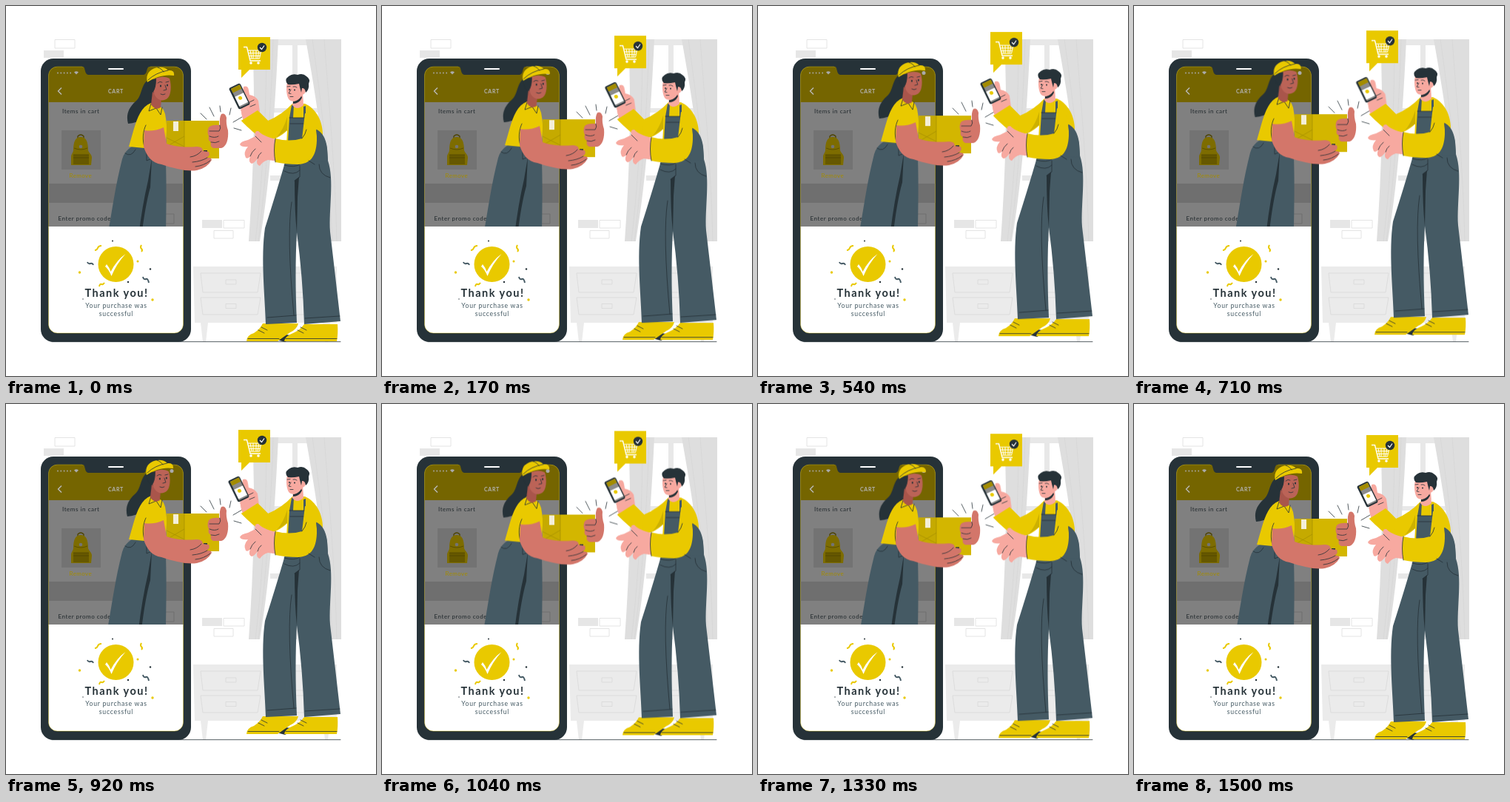
An HTML page without scripts that plays this animation: 500x500 px, repeating every 1540 ms.

```html
<!DOCTYPE html>
<html lang="en">
<head>
<meta charset="utf-8">
<title>Thank you</title>
<style>
html, body { margin: 0; width: 100%; height: 100%; overflow: hidden; background: #fff; }
svg { display: block; width: 100vw; height: 100vh; }
text { font-family: Lato, sans-serif; }
.bob, .sway { animation: 1540ms infinite cubic-bezier(.3, .2, .7, .8); }
.bob { animation-name: bob; }
.sway { animation-name: sway; }
@keyframes bob { 0%, 97.4%, 100% { transform: none; } 47.7% { transform: translateY(-9px); } }
@keyframes sway { 0%, 97.4%, 100% { transform: none; } 47.7% { transform: translateX(-1.5px); } }
.yellow { fill: #e9c900; }
.ink { fill: #263238; }
.denim { fill: #455a64; }
.pink { fill: #f7a9a0; }
.brown { fill: #d3766a; }
.line { fill: none; stroke: #263238; stroke-width: .8; stroke-linecap: round; stroke-linejoin: round; }
.pale { fill: none; stroke: #dedede; stroke-width: .8; }
.fold { fill: none; stroke: #d3d3d3; stroke-width: .6; }
</style>
</head>
<body>
<svg viewBox="0 0 500 500">
<defs>
  <clipPath id="aboveSheet"><rect width="500" height="298"/></clipPath>
  <clipPath id="screen"><rect x="57.500" y="82" width="182" height="360" rx="12"/></clipPath>
</defs>

<!-- room -->
<g id="room">
  <rect x="357" y="45" width="96" height="273" fill="#e8e8e8"/>
  <path fill="#fff" d="M362 53H387V138H356ZM394 53H411L424 138H394ZM355 144H387V229H346ZM394 144H425L432 229H394ZM345 236H387V318H343ZM394 236H433L438 318H394Z"/>
  <path fill="#dedede" d="M333 45H368C364 130 358 230 343 318H328C335 220 337 130 333 45ZM405 45H453V318H437C434 215 420 130 405 45Z"/>
  <path class="fold" d="M352 45C352 150 346 240 337 318M361 45C358 150 350 245 341 318M414 45C426 130 437 220 441 318M430 45C436 130 445 220 447 318"/>
  <rect x="51" y="60" width="27" height="10" fill="#e6e6e6"/>
  <rect x="265" y="289" width="27" height="11" fill="#e6e6e6"/>
  <path class="pale" d="M66 45.500H93V57H66ZM294 289.500H322V300H294ZM281 303.500H307V314H281Z"/>
  <path fill="#ebebeb" d="M253 352H447V428H255ZM263 428H273L270 454H266ZM428 428H438L435 454H431Z"/>
  <path fill="none" stroke="#d6d6d6" stroke-width=".7" d="M263 361H344L340 387H266ZM263 394H344L340 417H266ZM297 370H311V376H297ZM297 402.500H311V408.500H297ZM355 361H437L433 387H359ZM355 394H437L433 417H359Z"/>
  <path class="line" d="M62 453.700H452"/>
</g>

<!-- phone -->
<rect class="ink" x="47" y="71" width="203" height="383" rx="17"/>
<g clip-path="url(#screen)">
  <rect x="57" y="82" width="183" height="217" fill="#808080"/>
  <rect x="57" y="82" width="183" height="48" fill="#756500"/>
  <rect x="57" y="240" width="183" height="26" fill="#6f6f6f"/>
  <rect x="75" y="168" width="53" height="53" fill="#737373"/>
  <path d="M70 90.500H88" stroke="#aaa" stroke-width="1.800" stroke-linecap="round" stroke-dasharray="0 4.300"/>
  <path d="M92 89.500Q95 87 98 89.500L95 92.500Z" fill="#aaa"/>
  <circle cx="224" cy="90.500" r="2.500" fill="#aaa"/>
  <path d="M75 110.500L70.500 115L75 119.500" fill="none" stroke="#bbb" stroke-width="1.300"/>
  <text x="138" y="117.500" font-size="7" font-weight="700" letter-spacing=".7" fill="#b5b5b5">CART</text>
  <g fill="#20282c" font-size="8" letter-spacing=".55">
    <text x="76" y="145">Items in cart</text>
    <text x="70.500" y="289.500">Enter promo code</text>
  </g>
  <text x="85.500" y="232" font-size="8" letter-spacing=".4" fill="#a38c00">Remove</text>
  <g id="backpack">
    <path d="M97 179V176Q101 172 105 176V179" fill="none" stroke="#4d4300" stroke-width="1.300"/>
    <path d="M88 215V204C88 200 91 198 91 195C91 183 94 177 101 177S111 183 111 195C112 199 116 200 116 205L115 215Z" fill="#7d6c00"/>
    <path d="M91 201H112V214H91Z" fill="#665800"/>
    <path d="M91 201H112M91 205H112M92 192Q101 196 110 192" fill="none" stroke="#4d4300" stroke-width=".7"/>
    <circle cx="101" cy="190" r="2.300" fill="#737373"/>
  </g>
  <path d="M150 281H227V294H150Z" fill="none" stroke="#6a6a6a" stroke-width=".8"/>
  <rect x="57" y="298" width="183" height="144" fill="#fff"/>
</g>
<rect x="57.500" y="82" width="182" height="360" rx="12" fill="none" stroke="#e9c900" stroke-width=".6" opacity=".6"/>
<path class="ink" d="M103 81H195V82C191 82 191 85 190 88Q189 93 185 93H112Q108 93 107 88C106 84 106 82 103 82Z"/>
<path d="M139 85H158" stroke="#fff" stroke-width="2" stroke-linecap="round"/>

<g id="thanks">
  <circle class="yellow" cx="148.500" cy="349" r="24"/>
  <path fill="#fff" d="M136 349Q139.500 353 141.500 359Q150 343 161.500 335Q149 349 142.500 365Q139 356 134 352Z"/>
  <g class="yellow">
    <circle cx="178" cy="345" r="1.500"/><circle cx="99.500" cy="360" r="1.700"/><circle cx="198" cy="397" r="1.700"/>
  </g>
  <g class="ink">
    <circle cx="144" cy="317.500" r="1"/><circle cx="165" cy="373" r="1.200"/><circle cx="195" cy="355.500" r="1.200"/><circle cx="104" cy="396" r=".7"/>
  </g>
  <g fill="none" stroke-width="2">
    <path stroke="#e9c900" d="M120 330Q123 330 124 327T129 324M183 323Q181 326 183 328T183 332M126 379Q127 375 129 376T133 374"/>
    <path stroke="#455a64" d="M110 346Q111 349 114 348T118 350M185 366Q186 370 189 369T193 374"/>
  </g>
  <g text-anchor="middle" fill="#263238">
    <text x="149.500" y="393" font-size="14.500" font-weight="700" letter-spacing="1.500">Thank you!</text>
    <g font-size="8.700" letter-spacing=".75" fill="#455a64">
      <text x="149" y="408">Your purchase was</text>
      <text x="149" y="418.500">successful</text>
    </g>
  </g>
</g>

<!-- courier -->
<g clip-path="url(#aboveSheet)">
<g id="courier" class="bob">
  <g class="sway">
    <path class="ink" d="M193 99C181 107 185 121 175 129C165 138 162 148 165 159C181 158 193 149 199 138L208 126L205 99Z"/>
  </g>
  <path class="denim" d="M170 190H215C217 225 217 260 216 312H137C144 272 148 242 157 207Q160 196 170 190Z"/>
  <path class="ink" d="M192 236L197 206L195 245Q188 270 183 312H179Q184 270 192 236Z"/>
  <path class="line" d="M161 199Q169 205 175 194M203 194Q204 208 215 209M190 194V209L197 206"/>
  <path class="yellow" d="M196 131C183 136 178 149 172 169L166 190L187 192L215 193C217 178 218 162 216 152Q215 139 207 135Z"/>
  <path class="line" d="M187 190C184 181 185 169 189 161M196 132L193 142L203 138L209 147L211 137"/>
  <g class="sway">
    <path fill="#a9554b" d="M198 116L196 133Q202 142 209 137L210 126Z"/>
    <path fill="#bb6357" d="M195 102C205 95 213 94 221 98C224 108 223 121 218 125C210 131 201 125 199 115Q193 112 195 102Z"/>
    <path class="ink" d="M191 103Q198 99 203 98Q203 110 199 116Q193 116 191 103Z"/>
    <path class="yellow" d="M191 103C188 92 195 84 206 83Q214 82 219 87Q228 86 227 94C214 92 202 96 191 103Z"/>
    <path class="line" d="M192 100Q202 90 219 87M205 83Q211 85 213 89"/>
    <g class="ink"><ellipse cx="209" cy="108" rx="1" ry="1.500"/><ellipse cx="218" cy="107" rx="1" ry="1.500"/></g>
    <path class="line" d="M205 104Q208 101 211 103M216 103L220 102M215 107L217 113L213 114M209 119Q212 121 215 119"/>
  </g>

  <g id="parcel">
    <path fill="#d3b600" d="M217 155H288V206H217Z"/>
    <path fill="#c5aa00" d="M217 155H241V206H217Z"/>
    <path d="M217 178L241 190M217 190L241 176M241 155V206" fill="none" stroke="#a08a00" stroke-width=".6"/>
    <rect x="226" y="156" width="7" height="13" fill="#f4efd8"/>
    <path class="ink" d="M261 197H266L265 200L266 203H261L262 200ZM267 195H272Q272 199 270 200V203H269V200Q267 199 267 195Z"/>
  </g>
  <path class="brown" d="M187 168Q200 170 213 164L217 186C232 191 244 191 258 190Q266 190 266 196L274 197Q277 202 270 205Q277 204 278 208Q272 219 258 222C245 224 228 220 210 214C197 212 190 203 186 190Z"/>
  <path class="line" d="M249 204Q258 203 264 196M252 211Q264 210 272 205M256 217Q267 216 276 209"/>
  <path class="brown" d="M274 164Q278 160 289 161Q288 151 291 146Q296 144 298 151Q297 159 300 168C301 180 298 190 291 192H280Q275 189 277 184Q272 181 274 176Q271 170 274 164Z"/>
  <path class="line" d="M289 161Q291 165 288 169H275M275 176Q282 179 287 176M277 184Q283 186 288 183"/>
  <path class="line" d="M263 145L271 153M275 137L281 149M289 135L290 143M304 138L302 147M307 157L319 150M308 165L318 168"/>
</g>
</g>

<!-- customer -->
<g id="customer" class="bob">
  <g id="bubble">
    <path class="yellow" d="M314 42H357V86H329L318 97V86H314Z"/>
    <g fill="none" stroke="#fff">
      <path stroke-width="1.400" d="M321 55.500H325.500L330 74H344"/>
      <path d="M326.500 60H345L342.500 71H329M330 60L332 71M334 60V71M338 60V71M342 60L340 71M327 63.700H344M328 67.400H343"/>
    </g>
    <circle cx="331" cy="77" r="1.800" fill="#fff"/><circle cx="341" cy="77" r="1.800" fill="#fff"/>
    <circle class="ink" cx="346" cy="56" r="6.200"/>
    <path d="M343 56L345.500 58.500L349 53.500" fill="none" stroke="#fff" stroke-width="1.200"/>
  </g>

  <g id="shoes">
    <path class="ink" d="M362 450L378 444L392 446L377 454Z"/>
    <path class="yellow" d="M347 429H395Q393 437 384 441Q377 446 367 453H325Q325 445 335 442Q343 437 347 429Z"/>
    <path class="yellow" d="M403 430H448Q449 443 447 453H376Q377 446 388 442Q397 438 403 430Z"/>
    <path class="line" stroke-width=".5" d="M327 449.500H369M378 449.500H447M341 438L349 442M345 434L353 438M394 438L402 442M398 434L406 438"/>
  </g>
  <path class="yellow" d="M387 132L404 132C420 139 428 157 428 174L416 205H378L380 168C371 177 360 182 350 181C338 175 327 164 318 155L340 141L354 155Q373 147 387 132Z"/>
  <path d="M380 150Q375 167 366 177L380 168Z" fill="#cdb100"/>
  <path class="denim" d="M383 151L386 134L389 133L388 151H402L402 136L405 135L405 178L418 166Q432 172 434 193L435 209C444 235 436 274 438 305Q445 365 452 426L403 430Q401 365 393 306Q390 360 393 428L351 430C350 393 344 340 350 300Q365 253 376 215L381 184Z"/>
  <path class="ink" d="M390 236L396 231L394 258L393 306Q390 278 390 236Z"/>
  <path class="line" d="M383 151H404M384 159H402M376 215Q390 219 397 214M397 216V231L390 236M423 214Q423 228 438 232M376 223Q389 230 397 222M353 421L392 418M404 422L451 419M386 265Q379 310 389 418"/>
  <g id="head">
    <path class="pink" d="M389 122L387 134Q393 142 402 134L401 116Z"/>
    <path class="ink" d="M388 129Q395 128 399 121L400 124Q396 132 388 132Z"/>
    <path class="pink" d="M380 103H402L405 113Q405 119 400 120C397 127 389 131 383 127C379 123 378 111 380 103Z"/>
    <path class="ink" d="M381 106Q375 100 382 95Q387 91 394 93Q401 90 406 95Q412 99 409 105Q410 113 405 117Q404 110 400 111L399 117Q397 110 396 105Q387 107 381 106Z"/>
    <circle class="ink" cx="383" cy="113" r="1"/><circle class="ink" cx="390" cy="113.500" r="1"/>
    <path class="line" d="M380 109L384 108.500M388 109Q391 108 393 110M385 113L382 118L385 118.500M384 122.500L388 122.500"/>
  </g>

  <g id="handset" class="sway">
    <path class="pink" d="M321 109Q327 107 328 114L329 120Q337 121 341 128L343 143L321 155Q317 145 318 137Z"/>
    <path class="line" d="M329 130L335 127M330 136L337 133"/>
    <g transform="translate(315.500 122) rotate(-26)">
      <rect class="ink" x="-8.500" y="-16" width="17" height="32" rx="2.500"/>
      <rect x="-6" y="-14" width="13" height="28" fill="#8b8b8b"/>
      <rect x="-6" y="-14" width="13" height="6" fill="#a38c00"/>
      <rect x="-6" y="-2" width="13" height="14" fill="#fff"/>
      <circle class="yellow" cx="0" cy="2.500" r="2.500"/>
    </g>
    <path class="pink" d="M317 140Q322 137 329 137L334 146L321 152Z"/>
  </g>
  <path class="yellow" d="M318 155L340 141L354 155L350 181Q333 171 318 155Z"/>

  <path class="pink" d="M368 181C357 178 348 176 341 169Q335 168 337 176L327 181Q317 183 316 187Q318 191 327 190Q320 198 324 205Q327 207 330 203Q327 211 332 213Q335 213 340 206Q337 214 343 216Q347 210 354 208L368 210Z"/>
  <path class="line" d="M337 176L345 184M330 203Q332 197 337 193M340 206Q341 201 345 198"/>
  <path class="yellow" d="M404 145C416 146 421 160 420 182C419 204 411 213 395 214Q378 214 364 211Q361 195 364 179Q383 184 400 179Z"/>
  <path class="denim" d="M419 167Q431 174 434 193L435 210L416 211Q423 190 419 167Z"/>
  <path class="line" d="M400 179Q405 173 406 167M364 179Q361 195 364 211M409 209L417 214"/>
</g>
</svg>
</body>
</html>
```
